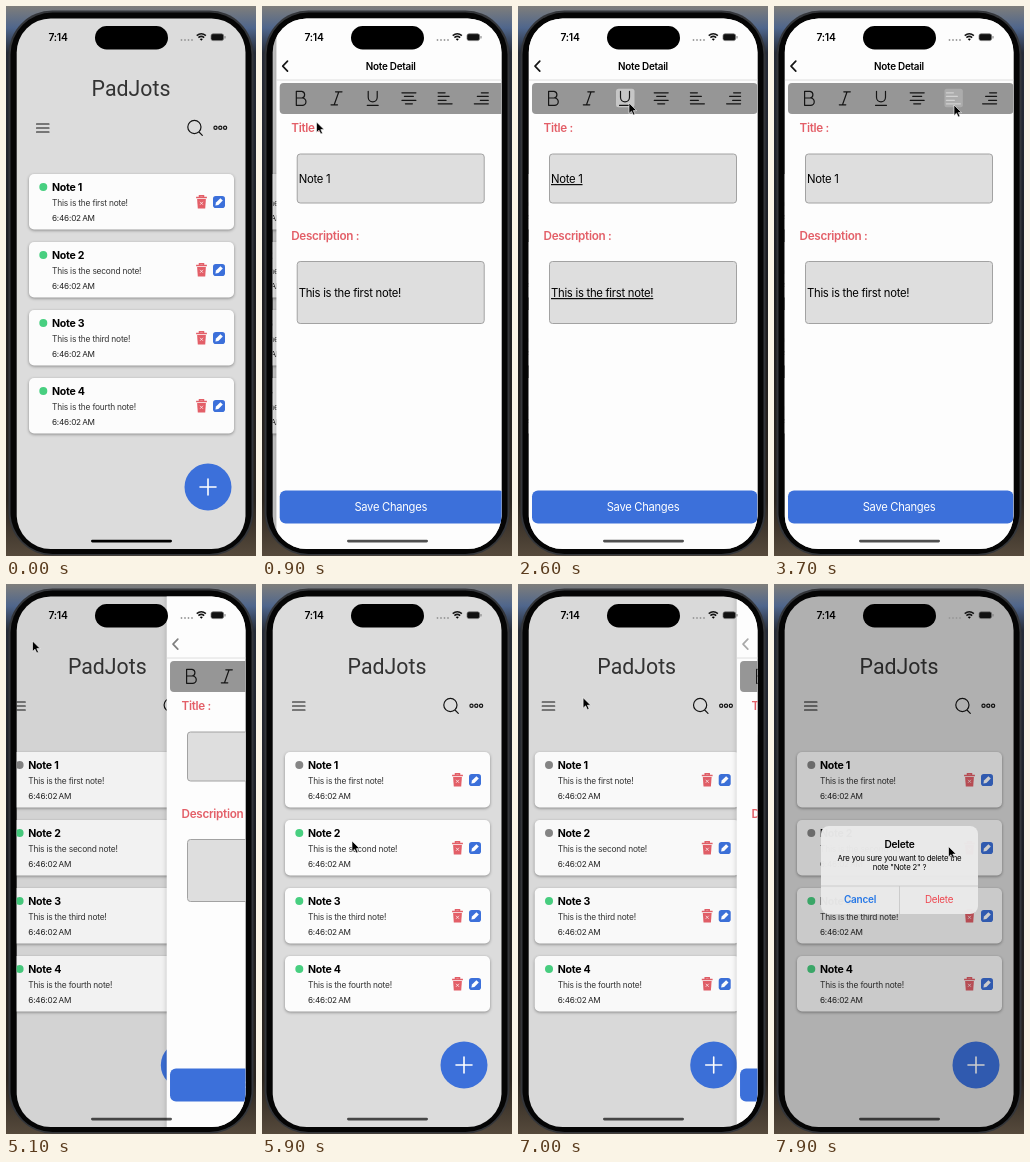
These frames come from a looping animation (250x550 px, 8 s). An HTML page:

```html
<!DOCTYPE html>
<html lang="en">
<head>
<meta charset="utf-8">
<title>Notes app</title>
<style>
html, body { margin: 0; width: 100%; height: 100%; overflow: hidden; background: #15161a; }
svg { display: block; width: 250px; height: 550px; }
text { font-family: Inter, "Liberation Sans", sans-serif; letter-spacing: -.025em; }
.brand { font-family: Roboto, "Open Sans", sans-serif; letter-spacing: 0; }
.line { fill: none; stroke: #151515; stroke-width: 1.2; stroke-linecap: round; stroke-linejoin: round; }
.card { fill: #fcfcfc; filter: drop-shadow(0 1.5px 1.5px rgba(0, 0, 0, .38)); }
.panel { filter: drop-shadow(-1px 0 2px rgba(0, 0, 0, .15)); }
.field { fill: #dedede; stroke: #a2a2a2; stroke-width: 1; }
</style>
</head>
<body>
<svg viewBox="0 0 250 550">
  <defs>
    <linearGradient id="wall" x2="0" y2="1">
      <stop offset="0" stop-color="#7f7e7b"/>
      <stop offset=".04" stop-color="#4f668c"/>
      <stop offset=".085" stop-color="#262b36"/>
      <stop offset=".5" stop-color="#1c1d21"/>
      <stop offset=".9" stop-color="#2b251f"/>
      <stop offset="1" stop-color="#564a3c"/>
    </linearGradient>
    <clipPath id="screen"><rect x="10.7" y="12.5" width="228.8" height="530.5" rx="34"/></clipPath>
  </defs>
  <rect width="250" height="550" fill="url(#wall)"/>
  <rect x="2.5" y="4.5" width="245" height="545" rx="44" fill="#34363a"/>
  <rect x="4.5" y="6.5" width="241" height="541.5" rx="42" fill="#050505"/>
  <g clip-path="url(#screen)">
    <rect width="250" height="550" fill="#dcdcdc"/>
    <g id="list"></g>
    <rect id="shade" width="250" height="550"/>
    <g id="detail"></g>
    <rect id="dim" width="250" height="550"/>
    <g id="status"></g>
    <g id="dialog"></g>
  </g>
  <path id="cursor" d="M0 0V10.5L2.5 8.2L4.3 12L6 11.2L4.3 7.6H7.6Z" fill="#000" stroke="#fff" stroke-width=".6"/>
</svg>
<script>
const $ = id => document.getElementById(id);
const BLUE = '#3c70da', RED = '#e35f68', WIDTH = 229;

// Text placed by its vertical centre
const txt = (x, y, size, str, attrs = '') =>
  `<text x="${x}" y="${y + size * .36}" font-size="${size}" ${attrs}>${str}</text>`;
const box = (x, y, w, h, r, attrs) =>
  `<rect x="${x}" y="${y}" width="${w}" height="${h}" rx="${r}" ${attrs}/>`;
const line = (d, attrs = '') => `<path class="line" d="${d}" ${attrs}/>`;
const MID = 'text-anchor="middle"';

const trash = y => `<g transform="translate(195.5 ${y})">
  <path d="M-4.4 -3H4.4L3.7 6.6H-3.7Z" fill="${RED}"/>
  <path d="M-5.4 -4.4H5.4M-2 -4.6V-6.2H2V-4.6" fill="none" stroke="${RED}" stroke-width="1.5"/>
  <path d="M-1.5 -.2L1.5 2.8M1.5 -.2L-1.5 2.8" stroke="#fff" stroke-width=".7"/></g>`;
const pencil = y => `<g transform="translate(213 ${y})">
  ${box(-6, -6, 12, 12, 2.8, `fill="${BLUE}"`)}
  <path d="M-3.6 3.6L-3 .6L1.4 -3.8L3.8 -1.4L-.6 3Z" fill="#fff"/></g>`;

const card = (word, i) => {
  const y = 168 + 68 * i;
  return box(23, y, 205, 55.5, 5, 'class="card"') +
    `<circle id="dot${i}" cx="37.3" cy="${y + 13}" r="4"/>` +
    txt(46, y + 13, 10.6, `Note ${i + 1}`, 'font-weight="700"') +
    txt(46, y + 29, 8.4, `This is the ${word} note!`, 'fill="#333"') +
    txt(46, y + 44, 8.2, '6:46:02\u2009AM', 'fill="#222"') +
    trash(y + 28) + pencil(y + 28);
};

$('list').innerHTML =
  txt(125, 82, 21.3, 'PadJots', `class="brand" fill="#333" ${MID}`) +
  line('M30.5 118H43M30.5 122H43M30.5 126H43') +
  line('M195 121A6.6 6.6 0 1 1 181.8 121A6.6 6.6 0 1 1 195 121M193 126L196.3 129.3') +
  [209.5, 214.3, 219.1].map(x =>
    `<circle class="line" cx="${x}" cy="121.7" r="1.6"/>`).join('') +
  ['first', 'second', 'third', 'fourth'].map(card).join('') +
  `<circle cx="202" cy="481" r="23.5" fill="${BLUE}"/>` +
  line('M194 481H210M202 473V489', 'style="stroke:#fff;stroke-width:1.6"');

// Toolbar glyphs, drawn around their centre
const glyphs = [
  'M-4 -7H1.5A3.4 3.4 0 0 1 1.5 -.3H-4ZM-4 -.3H2A3.6 3.6 0 0 1 2 7H-4Z',
  'M-1 -6.5H5.5M-5.5 6.5H1M2.3 -6.5L-2.3 6.5',
  'M-4.5 -7V-1A4.5 4.5 0 0 0 4.5 -1V-7M-5.5 7H5.5',
  'M-7 -5.5H7M-4.5 -2H4.5M-7 2H7M-3.5 5.5H3.5',
  'M-7 -5.5H0M-7 -2H4M-7 2H1M-7 5.5H7',
  'M0 -5.5H7M-4 -2H7M-1 2H7M-7 5.5H7'
];
const button = (d, i) => `<g transform="translate(${34.6 + 36.2 * i} 92.3)">
  ${box(-9, -9.5, 18.5, 18.5, 2.5, `id="lit${i}" fill="#c6c6c6"`)}${line(d, `id="glyph${i}"`)}</g>`;

$('detail').innerHTML =
  box(10.7, 0, 240, 550, 0, 'class="panel" fill="#fdfdfd"') +
  line('M21.8 55.2L17 60.2L21.8 65.2', 'id="back" style="stroke-width:1.7"') +
  txt(125, 60, 9.9, 'Note Detail', `font-weight="600" ${MID}`) +
  '<path d="M10.7 74H251" stroke="#d6d6d6" stroke-width=".8"/>' +
  box(14, 77, 225.5, 31, 4, 'fill="#969696"') +
  glyphs.map(button).join('') +
  txt(25.5, 122, 11.7, 'Title :', `font-weight="600" fill="${RED}"`) +
  box(31.5, 148, 187, 49, 3, 'class="field"') +
  txt(33, 173, 11.3, '', 'id="title"') +
  txt(25.5, 230, 11.7, 'Description :', `font-weight="600" fill="${RED}"`) +
  box(31.5, 255.5, 187, 62, 3, 'class="field"') +
  txt(33, 287, 11.3, '', 'id="body"') +
  box(14, 484.5, 225.5, 33, 6, `fill="${BLUE}"`) +
  txt(125, 501, 11.2, 'Save Changes', `fill="#fff" ${MID}`);

$('status').innerHTML =
  txt(42.5, 31.5, 10.3, '7:14', 'font-weight="600"') +
  box(89, 20, 73, 23.5, 11.7, 'fill="#000"') +
  [175.5, 179, 182.5, 186].map(x =>
    `<circle cx="${x}" cy="34" r=".9" fill="#999"/>`).join('') +
  line('M190.7 29.6Q195.3 25.8 199.9 29.6M192.4 31.6Q195.3 29.2 198.2 31.6', 'style="stroke-width:1.5;stroke-linecap:butt"') +
  '<path d="M193.7 33Q195.3 31.9 196.9 33L195.3 34.8Z"/>' +
  box(205, 27.8, 12.6, 6.8, 2, 'fill="#111" stroke="#777" stroke-width=".7"') +
  box(218.5, 30, 1, 2.6, .5, 'fill="#777"') +
  box(85, 533.7, 81, 2.8, 1.4, 'id="home"');

$('dialog').innerHTML =
  box(47, 242, 157, 88, 8, 'fill="#ebebeb" fill-opacity=".97"') +
  txt(125.5, 260.5, 10.2, 'Delete', `font-weight="600" ${MID}`) +
  txt(125.5, 274, 7.8, 'Are you sure you want to delete the', MID) +
  txt(125.5, 283.5, 7.8, 'note "Note 2" ?', MID) +
  '<path d="M47 302H204M125.5 302V330" stroke="#c4c4c4" stroke-width=".8"/>' +
  txt(86, 315.7, 10, 'Cancel', `font-weight="600" fill="#2577e6" ${MID}`) +
  txt(165, 315.7, 9.8, 'Delete', `fill="#ee464f" ${MID}`);

const clamp = v => Math.min(1, Math.max(0, v));
// Critically damped spring from 0 to 1
const spring = (t, start) => {
  const x = Math.max(0, t - start) * .016;
  return 1 - (1 + x) * Math.exp(-x);
};

// Times when each toolbar button is on
const lit = [[1200, 1500], [1800, 2100], [2500, 2800], [3100, 3500], [3600, 3900], [4200, 5500]];

// Cursor stops: time, x, y
const path = [
  [100, 150, 240], [400, 100, 195], [500, 98, 192], [900, 54.5, 116], [1200, 34, 95], [1500, 34, 95],
  [1800, 70, 96], [2200, 70, 96], [2500, 111, 97], [2800, 111, 97], [3100, 143, 98], [3400, 143, 98],
  [3600, 180, 99], [3800, 180, 99], [4100, 216, 97], [4300, 216, 97], [4800, 22, 60], [5100, 26.5, 57],
  [5600, 90, 255], [5900, 90, 257], [6400, 24, 80.5], [6600, 20, 61], [6800, 20, 61],
  [7400, 194, 264], [7650, 194, 263], [7900, 174.5, 262.5]
];
const cursorAt = t => {
  const i = Math.max(1, path.findIndex(p => p[0] >= t));
  const [a, b] = [path[i - 1], path[i]];
  const k = clamp((t - a[0]) / (b[0] - a[0]));
  const e = k * k * (3 - 2 * k);
  return [a[1] + (b[1] - a[1]) * e, a[2] + (b[2] - a[2]) * e];
};

function draw(t) {
  const open = t < 4960 ? spring(t, 520)
    : t < 5900 ? 1 - spring(t, 4960)
    : t < 6750 ? spring(t, 5910) : 1 - spring(t, 6750);
  $('list').setAttribute('transform', `translate(${-.3 * WIDTH * open} 0)`);
  $('detail').setAttribute('transform', `translate(${WIDTH * (1 - open)} 0)`);
  $('detail').style.display = open < .002 ? 'none' : '';
  $('shade').style.opacity = .11 * open;
  $('back').style.opacity = .3 + .7 * open;
  $('home').style.opacity = t < 500 ? 1 : .68;

  const read = [t >= 700, t >= 6100, false, false];
  read.forEach((seen, i) => $('dot' + i).setAttribute('fill', seen ? '#868686' : '#48cf80'));

  const on = lit.map(([from, to]) => t >= from && t < to);
  on.forEach((active, i) => {
    const pressed = active && i > 2 && t < lit[i][0] + 200;
    $('lit' + i).style.opacity = active ? (pressed ? .45 : 1) : 0;
    $('glyph' + i).style.stroke = pressed ? '#d2d2d2' : '#151515';
  });

  const second = t >= 5600;
  $('title').textContent = second ? 'Note 2' : 'Note 1';
  $('body').textContent = `This is the ${second ? 'second' : 'first'} note!`;
  const [x, anchor] = on[5] ? [217, 'end'] : on[3] ? [125, 'middle'] : [33, 'start'];
  for (const id of ['title', 'body']) {
    const el = $(id);
    el.setAttribute('x', x);
    el.style.textAnchor = anchor;
    el.style.fontWeight = on[0] ? 700 : 400;
    el.style.fontStyle = on[1] ? 'italic' : 'normal';
    el.style.textDecoration = on[2] ? 'underline' : 'none';
  }

  const alert = clamp((t - 7550) / 200);
  $('dim').style.opacity = .2 * alert;
  $('dialog').style.opacity = alert;
  const grow = 1 + .12 * (1 - alert);
  $('dialog').setAttribute('transform', `translate(125.5 286) scale(${grow}) translate(-125.5 -286)`);

  $('cursor').setAttribute('transform', `translate(${cursorAt(t)})`);
  $('cursor').style.display = t < 100 ? 'none' : '';
}

const begin = performance.now();
function tick() {
  const t = (performance.now() - begin) % 8000;
  draw(Math.floor(t / 100) * 100);
  requestAnimationFrame(tick);
}
tick();
</script>
</body>
</html>
```
